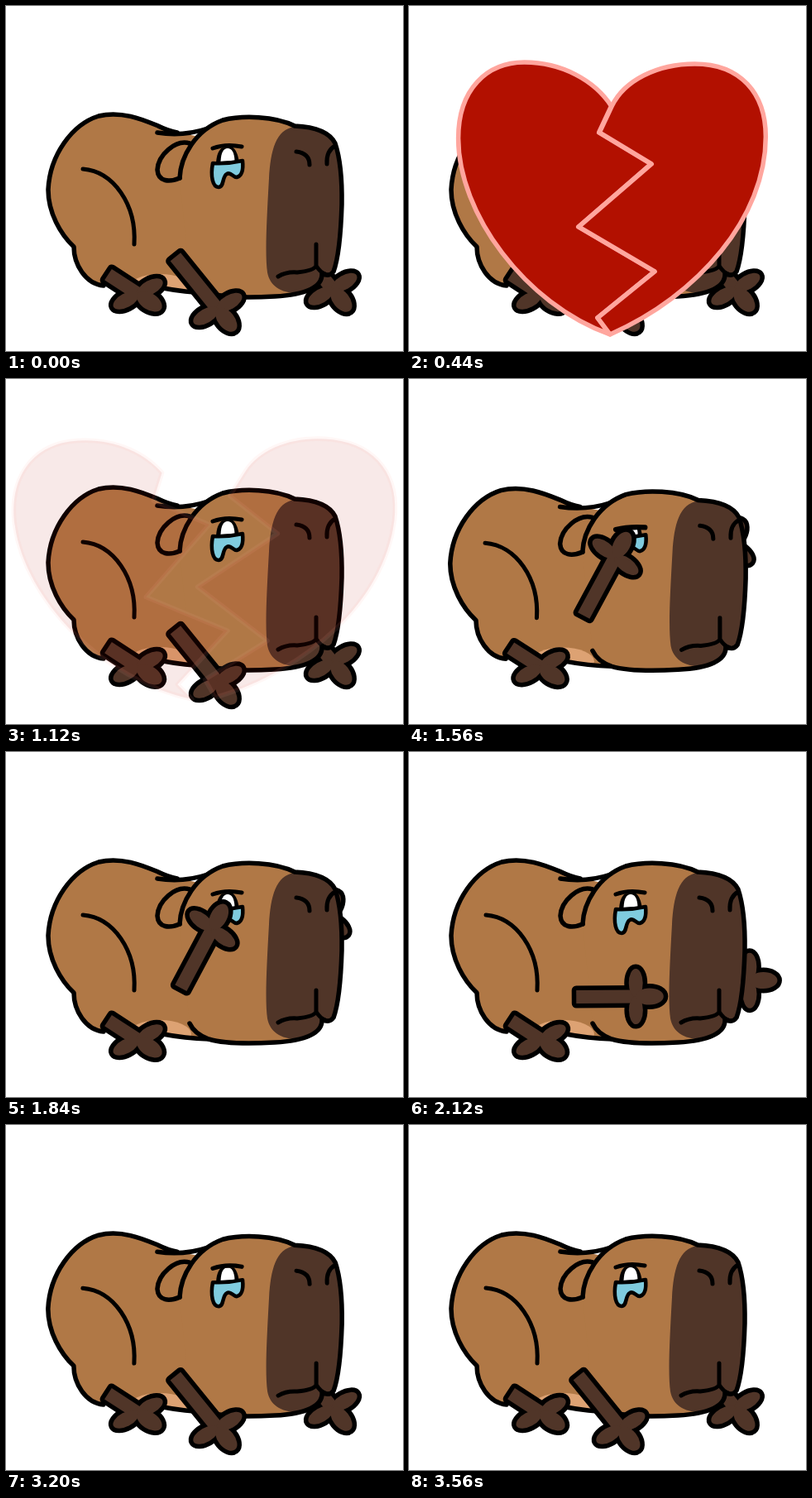
Animation of 480x417 px, one loop 3.84 s. Source, as an HTML page with a canvas:

```html
<!DOCTYPE html>
<html lang="en">
<head>
<meta charset="utf-8">
<title>Heartbroken capybara</title>
<style>
  html, body { margin: 0; width: 100%; height: 100%; overflow: hidden; background: #fff; }
  canvas { display: block; }
</style>
</head>
<body>
<canvas id="stage" width="480" height="417"></canvas>
<script>
const LOOP = 3840;
const FUR = '#b07846', DARK = '#503528', BELLY = '#dda273', TEAR = '#7fcbde';
const RED = '#b21000', PINK = '#ffa69e';
const ctx = document.getElementById('stage').getContext('2d');

const clamp = v => Math.max(0, Math.min(1, v));
const part = (t, a, b) => clamp((t - a) / (b - a));
const smooth = v => (1 - Math.cos(Math.PI * v)) / 2;
const mix = (a, b, k) => a + (b - a) * k;
const rad = deg => deg * Math.PI / 180;

const backCurve = `C66 276 51 250 51 222 C53 180 80 143 112 133
  C140 126 167 138 184 145 Q196 151 207 153`;
const bodyPath = new Path2D(`M82 291 ${backCurve} L300 170 L300 340 L245 347
  Q216 346 190 341 L116 338 C96 336 82 312 82 291Z`);
const bodyLine = new Path2D(`M245 347 Q216 346 190 341 M118 338 C96 336 82 312 82 291
  ${backCurve} M183 153 Q214 158 244 148`);
const headCurve = `C211 182 229 150 262 138 C286 132 325 133 349 145 C372 146 391 152 398 166
  C404 184 406.500 210 406 240 C405 272 403 302 396 321 Q391 328 382 323
  C383 340 362 349 325 351 C292 353 262 352 245 347 Q228 341 222 328`;
const headFill = new Path2D('M210 208 ' + headCurve + 'Z');
const headLine = new Path2D('M210 208 ' + headCurve);
const muzzle = new Path2D(`M349 146 C326 149 320 175 318 208 C315 262 313 300 316 322
  C319 338 332 347 352 347 L420 360 L420 140Z`);
const earPath = new Path2D('M222 166 C205 161 184 180 183 198 C184 213 198 213 210 208');
const details = new Path2D(`M93 197 C130 200 158 240 155 288
  M351 176 Q367 178 367 192 M388 191 Q387 175 398 169
  M375 288 L375 313 M329 327 Q339 321 352 322 Q372 320 375 314 Q380 322 386 324`);
const tearPath = new Path2D(`M250 190 C247 206 250 219 257 219 C264 219 261 206 267 203
  C272 200 274 207 279 207 C286 205 287 196 286 187 Q268 191 250 190Z`);

const leftSide = 'C225 90 185 68 140 68 C95 68 60 100 60 160 C60 250 140 360 243 397';
const rightSide = 'C260 90 300 70 345 70 C400 70 431 105 431 158 C431 255 350 350 243 397';
const crack = 'L228 377 L297 321 L205 267 L293 191 L230 153 L245 121';
const leftHalf = new Path2D('M245 121 ' + leftSide + crack + 'Z');
const rightHalf = new Path2D('M245 121 ' + rightSide + crack + 'Z');
const wholeHeart = new Path2D('M245 121 ' + leftSide + 'M245 121 ' + rightSide);
const crackLine = new Path2D('M245 121 L230 153 L293 191 L205 267 L297 321 L228 377 L243 397');

function fill(path, color) {
  ctx.fillStyle = color;
  ctx.fill(path);
}

function line(path, width = 5.5, color = '#000') {
  ctx.lineWidth = width;
  ctx.strokeStyle = color;
  ctx.stroke(path);
}

function clipped(path, draw) {
  ctx.save();
  ctx.clip(path);
  draw();
  ctx.restore();
}

// A rod with two side toes and one front toe; skew turns the side toes.
function limb(x, y, angle, len, skew) {
  ctx.save();
  ctx.translate(x, y);
  ctx.rotate(rad(angle));
  const rod = new Path2D();
  rod.rect(3, -8, len - 3, 16);
  const toes = [[-90 + skew, 8.5], [90 + skew, 8.5], [0, 10]].map(([a, width]) => {
    const toe = new Path2D(), turn = rad(a);
    toe.ellipse(len + 16.5 * Math.cos(turn), 16.5 * Math.sin(turn), 17, width, turn, 0, 7);
    return toe;
  });
  const shapes = [rod, ...toes];
  shapes.forEach(s => line(s, 11));
  shapes.forEach(s => fill(s, DARK));
  ctx.restore();
}

function arm(raise, rest, up) {
  const bend = 4 * raise * (1 - raise);
  limb(mix(rest[0], up[0], raise) - 7 * bend, mix(rest[1], up[1], raise) + bend,
    mix(51, -62, raise), 84 - 9 * bend, 9 * (1 - bend));
}

function eye(shut) {
  const ly = mix(172, 189, shut), ry = mix(170, 186, shut);
  const open = new Path2D(`M240 ${ly} L300 ${ry} L300 230 L240 230Z`);
  clipped(open, () => {
    fill(new Path2D('M254 192 C254 178 259 169 268 169 C277 169 281 179 282 191Z'), '#000');
    fill(new Path2D('M259.500 188 C260 177 263 172 268 172 C273 172 276 177 276.500 187Z'), '#fff');
  });
  fill(tearPath, TEAR);
  line(tearPath, 4.5);
  line(new Path2D(`M250 ${ly} Q266 ${mix(166, 187, shut)} 285 ${ry}`), mix(5, 7.5, shut));
}

function capybara(breath, raise) {
  ctx.save();
  ctx.translate(238, 395);
  ctx.scale(1 + 0.013 * breath, 1 - 0.012 * breath);
  ctx.translate(-238, -395);

  arm(raise, [342, 277], [346, 274]);
  fill(bodyPath, FUR);
  clipped(bodyPath, () => {
    ctx.fillStyle = BELLY;
    ctx.beginPath();
    ctx.ellipse(186, 341, 38, 17, 0, 0, 7);
    ctx.fill();
  });
  line(bodyLine);
  fill(headFill, FUR);
  clipped(headFill, () => fill(muzzle, DARK));
  fill(earPath, FUR);
  line(headLine);
  line(earPath);
  line(details, 5);
  eye(breath);
  limb(121, 323, 33, 46, 29);
  arm(raise, [203, 301], [210, 288]);
  ctx.restore();
}

function half(path, dx, dy, angle) {
  ctx.save();
  ctx.translate(243 + dx, 397 + dy);
  ctx.rotate(rad(angle));
  ctx.translate(-243, -397);
  fill(path, RED);
  line(path, 5.5, PINK);
  ctx.restore();
}

function heart(t) {
  if (t <= 40 || t >= 1160) return;
  ctx.save();
  ctx.globalAlpha = 1 - part(t, 730, 1160);
  if (t < 440) {
    const grow = 1 - (1 - part(t, 40, 240)) ** 2;
    const size = 1.075 * grow - 0.075 * smooth(part(t, 240, 340));
    ctx.translate(245, 234);
    ctx.scale(size, size);
    ctx.translate(-245, -234);
    fill(wholeHeart, RED);
    line(wholeHeart, 5.5, PINK);
    const shown = part(t, 300, 440);
    if (shown > 0) {
      ctx.setLineDash([450 * shown, 900]);
      line(crackLine, 5.5, PINK);
    }
  } else {
    const s = 1 - (1 - part(t, 440, 700)) ** 2;
    half(leftHalf, -18 * s, -10 * s, -8 * s);
    half(rightHalf, 10 * s, -12 * s, 7.2 * s);
  }
  ctx.restore();
}

function breathAt(t) {
  return [1440, 2520, 3160].reduce((sum, s) =>
    sum + smooth(part(t, s, s + 240)) - smooth(part(t, s + 280, s + 400)), 0);
}

function draw(now) {
  const t = now % LOOP;
  ctx.lineCap = ctx.lineJoin = 'round';
  ctx.fillStyle = '#fff';
  ctx.fillRect(0, 0, 480, 417);
  const raise = smooth(part(t, 1160, 1480)) - smooth(part(t, 1920, 2300));
  capybara(breathAt(t), raise);
  heart(t);
}

const start = performance.now();
function tick() {
  draw(performance.now() - start);
  requestAnimationFrame(tick);
}
tick();
</script>
</body>
</html>
```
